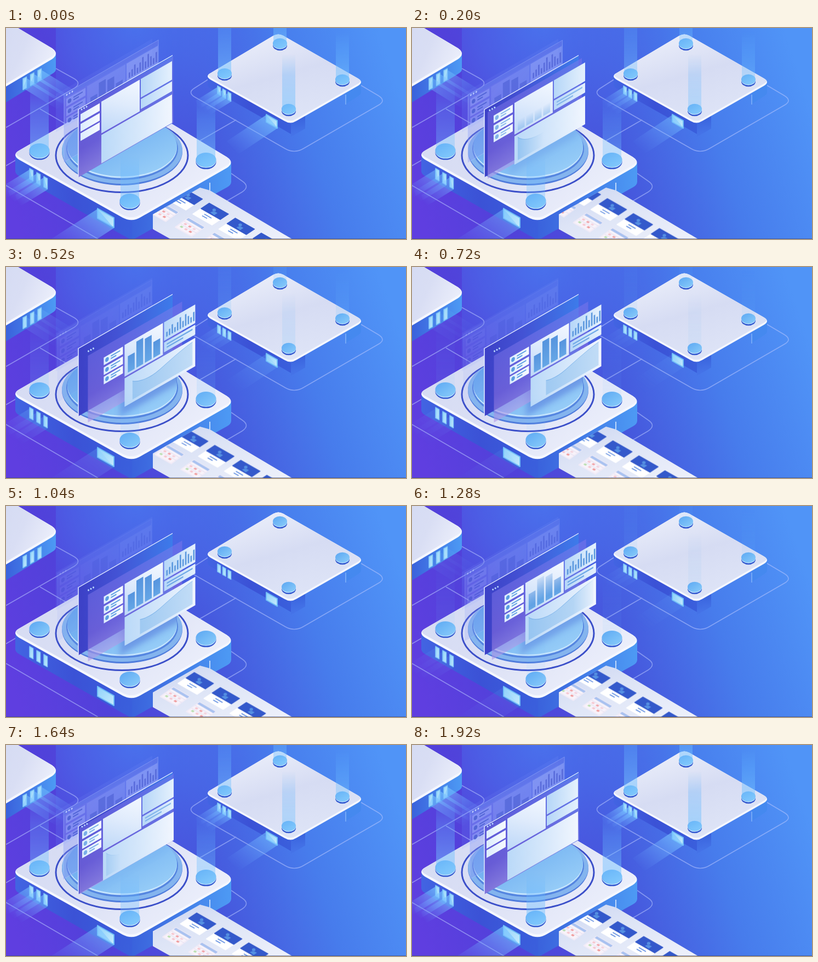
Animation of 730 by 386 pixels, one loop 1.96 s. Source, as an HTML page:

```html
<!DOCTYPE html>
<html lang="en">
<head>
<meta charset="utf-8">
<title>Isometric dashboard</title>
<style>
html, body { margin: 0; width: 100%; height: 100%; overflow: hidden; background: #4657de; }
svg { display: block; width: 730px; height: 386px; }
</style>
</head>
<body>
<svg id="stage" viewBox="0 0 730 386" xmlns="http://www.w3.org/2000/svg"></svg>
<script>
const LOOP = 1960;
const SLOPE = -0.576;
const stage = document.getElementById('stage');

// --- markup helpers ---
const stopList = stops =>
  stops.map(([o, c, a = 1]) => `<stop offset="${o}" stop-color="${c}" stop-opacity="${a}"/>`).join('');
const gradient = (id, [x1, y1, x2, y2], stops, units = 'objectBoundingBox') =>
  `<linearGradient id="${id}" x1="${x1}" y1="${y1}" x2="${x2}" y2="${y2}" gradientUnits="${units}">` +
  stopList(stops) + '</linearGradient>';
const radial = (id, x, y, r, stops) =>
  `<radialGradient id="${id}" cx="${x}" cy="${y}" r="${r}" gradientUnits="userSpaceOnUse">${stopList(stops)}</radialGradient>`;
const clip = (id, d) => `<clipPath id="${id}"><path d="${d}"/></clipPath>`;
const blur = (id, size) =>
  `<filter id="${id}" x="-30%" y="-30%" width="160%" height="160%"><feGaussianBlur stdDeviation="${size}"/></filter>`;
const path = (d, fill, extra = '') => `<path d="${d}" fill="${fill}" ${extra}/>`;
const line = (d, stroke, width, extra = '') =>
  `<path d="${d}" fill="none" stroke="${stroke}" stroke-width="${width}" ${extra}/>`;
const rect = (x, y, w, h, fill, extra = '') =>
  `<rect x="${x}" y="${y}" width="${w}" height="${h}" fill="${fill}" ${extra}/>`;
const ellipse = (x, y, rx, ry, fill, extra = '') =>
  `<ellipse cx="${x}" cy="${y}" rx="${rx}" ry="${ry}" fill="${fill}" ${extra}/>`;
const group = (id, body, extra = '') => `<g id="${id}" ${extra}>${body}</g>`;
const wall = (x, y, body) => `<g transform="matrix(1 ${SLOPE} 0 1 ${x} ${y})">${body}</g>`;

const disc = (x, y, r) => {
  const ry = r * 0.72;
  return ellipse(x, y + 3, r, ry, '#3157cf') + ellipse(x, y + 0.5, r, ry, '#bfe4fd') +
    ellipse(x, y - 0.8, r, ry, 'url(#disc)');
};
const vents = (x, y, dx, dy, w, h, lean) => [0, 1, 2].map(i => {
  const d = `M${x + i * dx} ${y + i * dy}l${w} ${lean * w}v${h}l${-w} ${-lean * w}z`;
  return path(d, 'url(#glass)', 'stroke="#82c8f7" stroke-width="1.5" stroke-linejoin="round"');
}).join('');
const port = (x, y, w, h) =>
  path(`M${x} ${y}l${w} ${w * 0.57}v${h}l${-w} ${-w * 0.57}z`, 'url(#glass)',
    'stroke="#6fbdf6" stroke-width="2" stroke-linejoin="round"');
const rimmedFace = (d, fill, rim, clipId) => path(d, '#f5f7fe') +
  `<g clip-path="url(#${clipId})">${path(d, fill, `transform="translate(0 ${-rim})"`)}</g>`;
const upBeam = (x, top, bottom, r) =>
  path(`M${x - r} ${top}H${x + r}V${bottom}A${r} ${r * 0.72} 0 0 1 ${x - r} ${bottom}Z`, 'url(#beamUp)');
const sideBeam = (x, y, w, h, dx, dy, fill) =>
  path(`M${x} ${y}l${w} ${h}l${dx} ${dy}l${-w} ${-h}z`, fill);

// --- window contents, in the plane of the window ---
const BARS = [30, 48, 44, 29];
const SPARKS = [10, 13, 19, 10, 17, 24, 13, 24, 17, 11, 19];
const ROWS = [11, 29, 46];
const CURVE = 'M48 76C60 92 85 98 105 92S145 78 166 76';
const bars = fill => BARS.map((h, i) => rect(48 + i * 15.5, 64 - h, 12.5, h, fill)).join('');
const sparks = fill => SPARKS.map((h, i) => rect(118 + i * 4.9, 39 - h, 2.6, h, fill)).join('');
const rowMarks = fill => ROWS.map(y =>
  ellipse(10, y + 7, 3.3, 4, fill) + rect(17, y + 3.5, 17, 2.2, fill) + rect(17, y + 8, 10, 2.2, fill)).join('');
const rows = fill => ROWS.map(y => rect(4, y, 35, 14, fill)).join('');

const panels = rows('url(#rowFill)') + rect(42, 10, 70, 58, 'url(#panelA)') +
  rect(114, 10, 57, 34, 'url(#panelB)') + rect(114, 47, 57, 18, 'url(#panelB)') +
  rect(42, 71, 129, 52, 'url(#panelD)');
const details = group('marks', rowMarks('#5b9de2') +
    rect(119, 51.5, 47, 2.6, '#6ea9e6') + rect(119, 57, 30, 2.6, '#6ea9e6')) +
  `<g mask="url(#barMask)">${bars('url(#barFill)')}</g>` +
  group('sparks', sparks('#5b98de')) +
  `<g mask="url(#areaMask)">${path(CURVE + 'V118H48Z', 'url(#areaFill)')}${line(CURVE, '#7fb4ea', 1)}</g>`;

const ghost = rect(0, 0, 172, 124, 'url(#ghostFill)', 'stroke="#a9bcff" stroke-opacity=".6"') +
  rect(0, 0, 172, 8, '#5d74e8', 'opacity=".55"') +
  [5, 10, 15].map(x => ellipse(x, 4, 1.4, 1.6, '#c4d2ff')).join('') +
  rows('rgba(170,190,255,.38)') + rowMarks('#5266d6') +
  rect(42, 10, 70, 58, '#a4b5fa', 'opacity=".22"') + rect(114, 10, 57, 34, '#b4c2fc', 'opacity=".36"') +
  rect(114, 47, 57, 18, '#a4b5fa', 'opacity=".25"') + rect(42, 71, 129, 52, '#a4b5fa', 'opacity=".22"') +
  `<g opacity=".75">${bars('#5366d8')}${sparks('#4d5fd2')}</g>`;

// --- conveyor cards ---
const STEP = [47.5, 27.4];
const contactCard =
  path('M0 0L35 20L5 40L-30 20Z', '#fff', 'stroke="#fff" stroke-width="1.5" stroke-linejoin="round"') +
  path('M0 0L35 20L20 30L-15 10Z', '#3459cb', 'stroke="#3459cb" stroke-width="1.5" stroke-linejoin="round"') +
  ellipse(9, 12.5, 3.2, 2.7, '#5590e2') + path('M2 17Q8 13 15 18L9 22Z', '#5590e2') +
  line('M-9 20l13 7.5M-13 23l9 5', '#5c8be0', 1.6);
const DOTS = ['#f6c6cf', '#f0a3a8', '#f3d3df', '#b9dfb0', '#f6c6cf', '#ef9a9a'];
const calendarCard =
  path('M0 0L29 17L6 34L-24 17Z', '#f8f3fa', 'stroke="#f1ebf7" stroke-width="2" stroke-linejoin="round"') +
  path('M0 0L29 17L25 20L-4 3Z', '#a9c2f0') +
  DOTS.map((c, i) => {
    const [u, v] = [i % 3, Math.floor(i / 3)];
    return path(`M${-6 + u * 8 - v * 7} ${9 + u * 4.6 + v * 5}l4 2.3l-3 2.2l-4 -2.3z`, c);
  }).join('') + line('M-8 6l29 17M-14 11l29 17', '#dcd8ee', 0.8);
const cards = Array.from({ length: 9 }, (_, i) => {
  const [x, y] = [323.5 + (i - 1) * STEP[0], 293 + (i - 1) * STEP[1]];
  return `<g transform="translate(${x} ${y})">${contactCard}</g>` +
    `<g transform="translate(${x - 38} ${y + 27})">${calendarCard}</g>`;
}).join('');

// --- scene ---
const mainFace = 'M24 224L190 128Q207 119 224 128L403 236Q418 246 403 256L246 346Q230 356 213 347L24 241Q10 232 24 224Z';
const rightFace = 'M374 82L488 14Q497 9 506 14L642 92Q654 99 642 106L530 170Q519 177 508 170L374 95Q362 88 374 82Z';
const cornerFace = 'M0 -13L84 37Q98 47 84 57L0 107Z';
const BELT = 'M268 341L354 292L372 297L522 386H300L268 368Z';

const defs = `<defs>
${gradient('bg', [0, 300, 700, 60], [[0, '#5f3ee0'], [.2, '#5141da'], [.5, '#4657dd'], [.75, '#477cec'], [1, '#5094f7']], 'userSpaceOnUse')}
${radial('skyGlow', 235, -10, 260, [[0, '#4a7cf2', .75], [.45, '#4a72ee', .5], [1, '#4a66ea', 0]])}
${gradient('face', [0, 0, 1, .6], [[0, '#d5dbf3'], [.45, '#d9def4'], [1, '#eceffb']])}
${gradient('faceR', [.2, 0, .7, 1], [[0, '#eef1fb'], [.5, '#d6dcf3'], [1, '#dfe5f7']])}
${gradient('sideL', [0, 0, 1, 0], [[0, '#4264e2'], [.5, '#3b52d6'], [1, '#3a5fdc']])}
${gradient('sideR', [0, 0, 1, 0], [[0, '#3a62dc'], [1, '#4d9af4']])}
${gradient('fadeDown', [0, 0, 0, 1], [[0, '#3157d5', .75], [1, '#3f63e0', .15]])}
${gradient('disc', [0, 0, 1, 1], [[0, '#5ba6f2'], [1, '#8bcdfa']])}
${gradient('hub', [0, 0, 1, 1], [[0, '#5d9bea'], [.5, '#7db9f3'], [1, '#a0d4f9']])}
${gradient('glass', [0, 0, 1, 1], [[0, '#8fd2fa'], [1, '#c6ebfd']])}
${gradient('beamUp', [0, 0, 0, 1], [[0, '#62b4ff', 0], [.35, '#62b4ff', .3], [1, '#7cc8ff', .58]])}
${gradient('beamDL', [1, 0, 0, 1], [[.15, '#79c4ff', .65], [.9, '#6a9cff', 0]])}
${gradient('beamDR', [0, 0, 1, 1], [[.1, '#79c4ff', .6], [.9, '#6a9cff', 0]])}
${gradient('plate', [0, 0, 1, 0], [[0, '#3c40c6'], [.4, '#4352d4'], [1, '#3d7bea']])}
${gradient('sheet', [0, 0, 0, 1], [[0, '#8479ec', .45], [.6, '#8a70e0', .55], [1, '#b09ae8', .6]])}
${gradient('ghostFill', [0, 0, 1, 1], [[0, '#8d9cf6', .42], [1, '#7a86ee', .25]])}
${gradient('rowFill', [0, 0, 1, 0], [[0, '#dcecfd'], [1, '#f6faff']])}
${gradient('panelA', [0, 1, 1, 0], [[0, '#bcd7f8'], [.55, '#dfebfc'], [1, '#f3f8ff']])}
${gradient('panelB', [0, 0, 1, 0], [[0, '#b5d6f8'], [1, '#e5f1fd']])}
${gradient('panelD', [0, 0, 1, 0], [[0, '#bad9f8'], [.55, '#d7e8fb'], [1, '#f1f6fe']])}
${gradient('barFill', [0, 0, 0, 1], [[0, '#5694de'], [1, '#65a6e6']])}
${gradient('areaFill', [0, 0, 1, 0], [[0, '#97c5f1'], [1, '#c1dcf6']])}
${gradient('belt', [0, 0, 1, 1], [[0, '#cbd5f1'], [.4, '#dde4f6'], [1, '#eef1fb']])}
${gradient('softUp', [0, 0, 0, 1], [[0, '#fff', 0], [.4, '#fff', 1]])}
${gradient('softLeft', [0, 0, 1, 0], [[.7, '#fff', 1], [1, '#fff', 0]])}
${blur('cardBlur', .5)}${blur('shadowBlur', 6)}
<mask id="barMask" maskUnits="userSpaceOnUse" x="40" y="0" width="80" height="80">${rect(40, 0, 80, 120, 'url(#softUp)', 'id="barWipe"')}</mask>
<mask id="areaMask" maskUnits="userSpaceOnUse" x="40" y="60" width="140" height="70">${rect(-110, 60, 150, 70, 'url(#softLeft)', 'id="areaWipe"')}</mask>
${clip('beltClip', BELT)}${clip('mainClip', mainFace)}${clip('rightClip', rightFace)}${clip('cornerClip', cornerFace)}
${clip('hubClip', 'M112 219A100 55.5 0 0 0 312 219V100H112Z')}
</defs>`;

const tracks = line('M372 92L344 110Q331 118 344 126L510 221Q526 230 542 221L680 141Q694 133 680 124L648 105' +
  'M420 168L330 220M411 266L431 280Q446 290 431 300L385 327M0 288L168 386' +
  'M91 74L125 93Q138 101 125 110L0 182M62 148L120 182M0 252L24 238', '#b9c6ff', 1.6, 'opacity=".55"');

const cornerBlock = path('M0 98L91 47V76Q91 80 84 84L0 136Z', 'url(#sideR)') +
  rimmedFace(cornerFace, 'url(#face)', 5, 'cornerClip') +
  vents(31, 93, 13.5, -7.5, 6.5, 20, -.57);

const rightBlock = path('M368 88V105Q368 108 374 111L508 187Q520 194 520 194V174Z', 'url(#sideL)') +
  path('M520 174L546 160V184L520 199Z', 'url(#fadeDown)') +
  path('M620 119L648 99V118Q648 121 642 125L620 139Z', '#4289ee', 'opacity=".7"') +
  line('M620 122V140', '#9fc8ff', 1) +
  rimmedFace(rightFace, 'url(#faceR)', 4, 'rightClip') +
  vents(386, 106, 9.5, 5.5, 5.5, 14, .57) + port(475, 158, 20, 14) +
  disc(399, 84, 13) + disc(500, 29, 13) + disc(614, 95, 13) + disc(516, 149, 13);

const hub = ellipse(211.5, 233, 120.5, 67.5, 'none', 'stroke="#3b4fc9" stroke-width="3"') +
  ellipse(212, 226, 110, 62, '#4f7cdc') + ellipse(212, 224, 110, 61, '#84b4ee') +
  ellipse(212, 221, 102, 57, '#5586e0') + ellipse(212, 219, 100, 55.5, '#c4e4fd') +
  ellipse(212, 216.5, 100, 55, 'url(#hub)');

const mainBlock = path('M17 232V262Q17 267 24 271L213 379Q230 388 230 388V350Z', 'url(#sideL)') +
  path('M230 350V388L404 291Q411 287 411 281V246Z', 'url(#sideR)') +
  path(BELT, 'url(#belt)') +
  `<g clip-path="url(#beltClip)">${group('cards', cards, 'filter="url(#cardBlur)"')}</g>` +
  line('M372 283V297', '#e6f0ff', 1.5) +
  rimmedFace(mainFace, 'url(#face)', 5, 'mainClip') + hub +
  vents(43, 257, 13, 7.3, 6.5, 19, .57) + port(167, 330, 30, 18) +
  disc(61, 225, 18.5) + disc(365, 242, 18.5) + disc(226, 317, 18.5);

const lowBeams = [0, 1, 2].map(i =>
  sideBeam(43 + i * 13, 259 + i * 7.3, 7, 22, -52, 32, 'url(#beamDL)') +
  sideBeam(386 + i * 9.5, 108 + i * 5.5, 5.5, 16, -40, 25, 'url(#beamDL)') +
  sideBeam(31 + i * 13.5, 110 - i * 7.5, 7, -18, 68, 42, 'url(#beamDR)')).join('') +
  sideBeam(167, 331, 30, 35, -86, 56, 'url(#beamDL)') + sideBeam(475, 159, 21, 24, -72, 48, 'url(#beamDL)');
const highBeams = upBeam(61, 95, 224, 17) + upBeam(365, 125, 241, 17) + upBeam(226, 232, 316, 17) +
  upBeam(399, -45, 83, 12) + upBeam(500, -60, 28, 12) + upBeam(614, 5, 94, 12) + upBeam(516, 48, 148, 12);

const panelShadow = group('shadow', wall(132, 149, rect(34, 80, 125, 56, '#4a68d4', 'filter="url(#shadowBlur)"')));
const windows =
  wall(91, 121, rect(0, 0, 176, 70, '#8a9cf8', 'opacity=".1"')) +
  group('ghost', wall(106, 121, ghost)) +
  `<g clip-path="url(#hubClip)">${panelShadow}</g>` +
  wall(132, 149, rect(0, 0, 172, 124, 'url(#plate)') + line('M0 124V0H172', '#dfe8ff', 1.6)) +
  group('sheet', wall(132, 149, rect(1, 2, 172, 122, 'url(#sheet)'))) +
  group('dots', [138, 142.5, 147].map((x, i) => ellipse(x, 149 - i * 2.5, 1.5, 1.7, '#b9d8ff')).join('')) +
  group('content', wall(132, 149, panels + details));

stage.innerHTML = defs + rect(0, 0, 730, 386, 'url(#bg)') + rect(91, 0, 430, 260, 'url(#skyGlow)') +
  tracks + cornerBlock + rightBlock + mainBlock +
  group('lowBeams', lowBeams) + windows + group('highBeams', highBeams) +
  rect(0, 385, 730, 1, '#33457f', 'opacity=".6"');

// --- motion ---
const part = {};
stage.querySelectorAll('[id]').forEach(el => part[el.id] = el);
const clamp = x => Math.min(1, Math.max(0, x));
const ease = x => (1 - Math.cos(Math.PI * clamp(x))) / 2;
const pulse = (t, inStart, inEnd, outStart, outEnd) =>
  clamp((t - inStart) / (inEnd - inStart)) * (1 - clamp((t - outStart) / (outEnd - outStart)));
const move = (el, x, y) => el.setAttribute('transform', `translate(${x.toFixed(2)} ${y.toFixed(2)})`);
const fade = (el, a) => el.setAttribute('opacity', a.toFixed(3));

function draw(t) {
  const open = ease(t / 540) * (1 - ease((t - 1060) / 700));
  move(part.content, 42.5 * open, 8 * open);
  move(part.shadow, 42.5 * open, 8 * open);
  fade(part.shadow, 0.45 * open);
  move(part.sheet, 16.5 * open, 12 * open);
  move(part.dots, 12.5 * open, 5 * open);
  move(part.ghost, -12 * open, 2 * open);
  fade(part.ghost, 1 - 0.72 * open * open);

  fade(part.marks, pulse(t, 60, 260, 1600, 1780));
  move(part.barWipe, 0, 64 - 112 * pulse(t, 120, 600, 1120, 1440));
  const grow = pulse(t, 220, 560, 1300, 1560);
  part.sparks.setAttribute('transform', `matrix(1 0 0 ${grow.toFixed(3)} 0 ${(39 * (1 - grow)).toFixed(2)})`);
  fade(part.sparks, clamp(grow * 1.4));
  move(part.areaWipe, 180 * pulse(t, 40, 560, 1120, 1760), 0);

  const glow = 1 - 0.62 * ease(t / 450) - 0.38 * ease((t - 400) / 600) + ease((t - 1060) / 800);
  fade(part.lowBeams, glow);
  fade(part.highBeams, glow);

  const travel = -2.875 * t / 40;
  const wrapped = travel % STEP[0];
  move(part.cards, wrapped, wrapped * STEP[1] / STEP[0]);
}

const start = performance.now();
function frame() {
  draw((performance.now() - start) % LOOP);
  requestAnimationFrame(frame);
}
draw(0);
requestAnimationFrame(frame);
</script>
</body>
</html>
```
